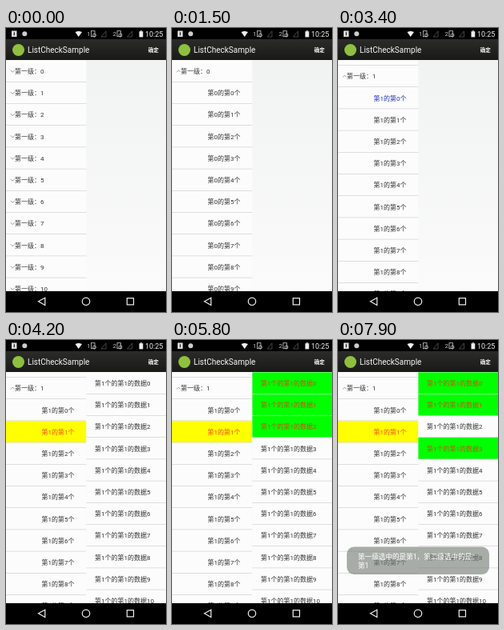
An HTML page with a canvas that plays this animation: 200 by 355 pixels, repeating every 8000 ms.

```html
<!DOCTYPE html>
<html lang="zh">
<head>
<meta charset="utf-8">
<style>
html, body { margin: 0; height: 100%; overflow: hidden; background: #000; }
canvas { display: block; }
</style>
</head>
<body>
<canvas id="stage" width="200" height="355"></canvas>
<script>
const ctx = document.getElementById('stage').getContext('2d');
const LOOP = 8000, STEP = 100;
const TOP = 40.4, BOTTOM = 329, ROW = 27.2, SPLIT = 100.4, LINE = 0.6;
// The TC face centres the full-width colon and comma
const FONT = 'Roboto, "Noto Sans CJK TC", "Noto Sans CJK SC", "Noto Sans CJK", sans-serif';
const INK = '#333', RED = 'rgba(245,45,30,.85)', BLUE = '#2334b0', PAPER = '#fbfcfb';

// [time, offset] of the left list, eased between points
const SCROLL = [[0, 0], [600, 176], [1200, 0], [2600, 0], [3100, 20.8], [LOOP, 20.8]];
// [row, on, off] of the checked rows on the right
const CHECKS = [[0, 4800, LOOP], [1, 5100, LOOP], [2, 5400, 6400], [3, 7100, LOOP]];

function rect(x, y, w, h, color) {
  ctx.fillStyle = color;
  ctx.fillRect(x, y, w, h);
}

function text(str, x, y, color = INK, size = 8, weight = 400) {
  ctx.font = `${weight} ${size}px ${FONT}`;
  ctx.fillStyle = color;
  ctx.fillText(str, x, y + size * 0.36);
}

function path(points, color, closed, filled) {
  ctx.beginPath();
  points.forEach(([x, y]) => ctx.lineTo(x, y));
  if (closed) ctx.closePath();
  ctx.fillStyle = ctx.strokeStyle = color;
  filled ? ctx.fill() : ctx.stroke();
}

function circle(x, y, r, color, filled) {
  ctx.beginPath();
  ctx.arc(x, y, r, 0, 7);
  ctx.fillStyle = ctx.strokeStyle = color;
  filled ? ctx.fill() : ctx.stroke();
}

function gradient(y0, y1, from, to) {
  const g = ctx.createLinearGradient(0, y0, 0, y1);
  g.addColorStop(0, from);
  g.addColorStop(1, to);
  return g;
}

function scrollAt(t) {
  const i = SCROLL.findIndex(p => p[0] > t);
  const [t0, a] = SCROLL[i - 1], [t1, b] = SCROLL[i];
  const u = (t - t0) / (t1 - t0);
  return a + (b - a) * u * u * (3 - 2 * u);
}

function row(y, x, label, fill, color) {
  if (y > BOTTOM || y + ROW < TOP) return;
  const [left, width] = x < SPLIT ? [0, SPLIT] : [SPLIT, 200 - SPLIT];
  if (fill) rect(left, y, width, ROW - LINE, fill);
  rect(left, y + ROW - LINE, width, LINE, 'rgba(0,0,0,.2)');
  text(label, x, y + ROW / 2 + 0.2, color);
}

function leftList(t, open, chosen) {
  let y = TOP - scrollAt(t);
  rect(0, TOP, SPLIT, BOTTOM - TOP, PAPER);
  for (let group = 0; group < 20; group++) {
    const mid = y + ROW / 2, d = group === open ? -1.3 : 1.3;
    row(y, 11, `第一级：${group}`);
    ctx.lineWidth = 0.8;
    path([[5.8, mid - d], [8.3, mid + d], [10.8, mid - d]], '#8c8c8c');
    y += ROW;
    for (let child = 0; group === open && child < 10; child++) {
      const hit = child === chosen;
      row(y, 44.4, `第${group}的第${child}个`, hit && t >= 3500 && '#ff0',
          hit ? (t < 3500 ? BLUE : RED) : INK);
      y += ROW;
    }
  }
}

function rightList(t, chosen) {
  rect(SPLIT, TOP, 200 - SPLIT, BOTTOM - TOP, PAPER);
  for (let i = 0; i < 11; i++) {
    const on = CHECKS.some(([n, from, to]) => n === i && t >= from && t < to);
    row(TOP + i * ROW, 111, `第1个的第${chosen}的数据${i}`, on && '#0f0', on ? RED : INK);
  }
}

function statusBar() {
  rect(0, 0, 200, 14, '#000');
  rect(7, 3.5, 6.5, 7.5, '#ddd');
  rect(9.7, 5.2, 1.2, 4, '#222');
  circle(23.3, 7.3, 3, '#ccc', true);
  path([[86.5, 5], [90.7, 3.7], [95, 5], [90.7, 11]], '#eee', true, true);
  ctx.lineWidth = 0.8;
  [101, 133.5].forEach((x, i) => {
    text(i + 1, x, 7.5, '#bbb', 8);
    ctx.strokeStyle = '#ccc';
    ctx.strokeRect(x + 5.5, 3.7, 4.5, 7);
    circle(x + 9.5, 9, 2, '#ccc');
    path([[x + 18, 11], [x + 24, 11], [x + 24, 4]], '#555', true);
  });
  rect(166.5, 4.2, 4.8, 7.2, '#eee');
  rect(168, 3.2, 1.8, 1, '#eee');
  text('10:25', 174, 7.6, '#f2f2f2', 9);
}

function actionBar() {
  rect(0, 14, 200, 26, gradient(14, 40, '#2b2c2a', '#191a18'));
  circle(15.5, 27.5, 7.5, '#8fbf3f', true);
  text('ListCheckSample', 27, 27.3, '#f4f4f4', 10);
  text('确定', 177.7, 27.3, '#f4f4f4', 6.5, 700);
}

function navBar() {
  rect(0, BOTTOM, 200, 26, '#000');
  ctx.lineWidth = 1.2;
  path([[40.5, 341.8], [48.8, 337.2], [48.8, 346.4]], '#eee', true);
  circle(100, 341.8, 4.7, '#eee');
  ctx.strokeRect(151.3, 337.7, 8.2, 8.2);
}

function toast(opacity) {
  ctx.globalAlpha = opacity;
  ctx.beginPath();
  ctx.roundRect(11, 258.5, 178, 34.5, 9);
  ctx.fillStyle = 'rgba(120,126,120,.63)';
  ctx.fill();
  text('第一级选中的是第1，第二级选中的是：', 25, 270.5, '#fff', 8.6);
  text('第1', 25, 281.5, '#fff', 8.6);
  ctx.globalAlpha = 1;
}

function draw(t) {
  const open = t >= 2600 ? 1 : t >= 1500 && t < 2100 ? 0 : -1;
  const chosen = t >= 4200 ? 1 : t >= 3400 ? 0 : -1;
  rect(0, 0, 200, 355, gradient(41, 328, '#f1f3f2', '#fafbfa'));
  leftList(t, open, chosen);
  if (t >= 3500) rightList(t, chosen);
  statusBar();
  actionBar();
  navBar();
  if (t >= 7500) toast(Math.min(1, (t - 7400) / 500));
}

function tick() {
  draw(Math.floor(performance.now() % LOOP / STEP) * STEP);
  requestAnimationFrame(tick);
}
tick();
</script>
</body>
</html>
```
